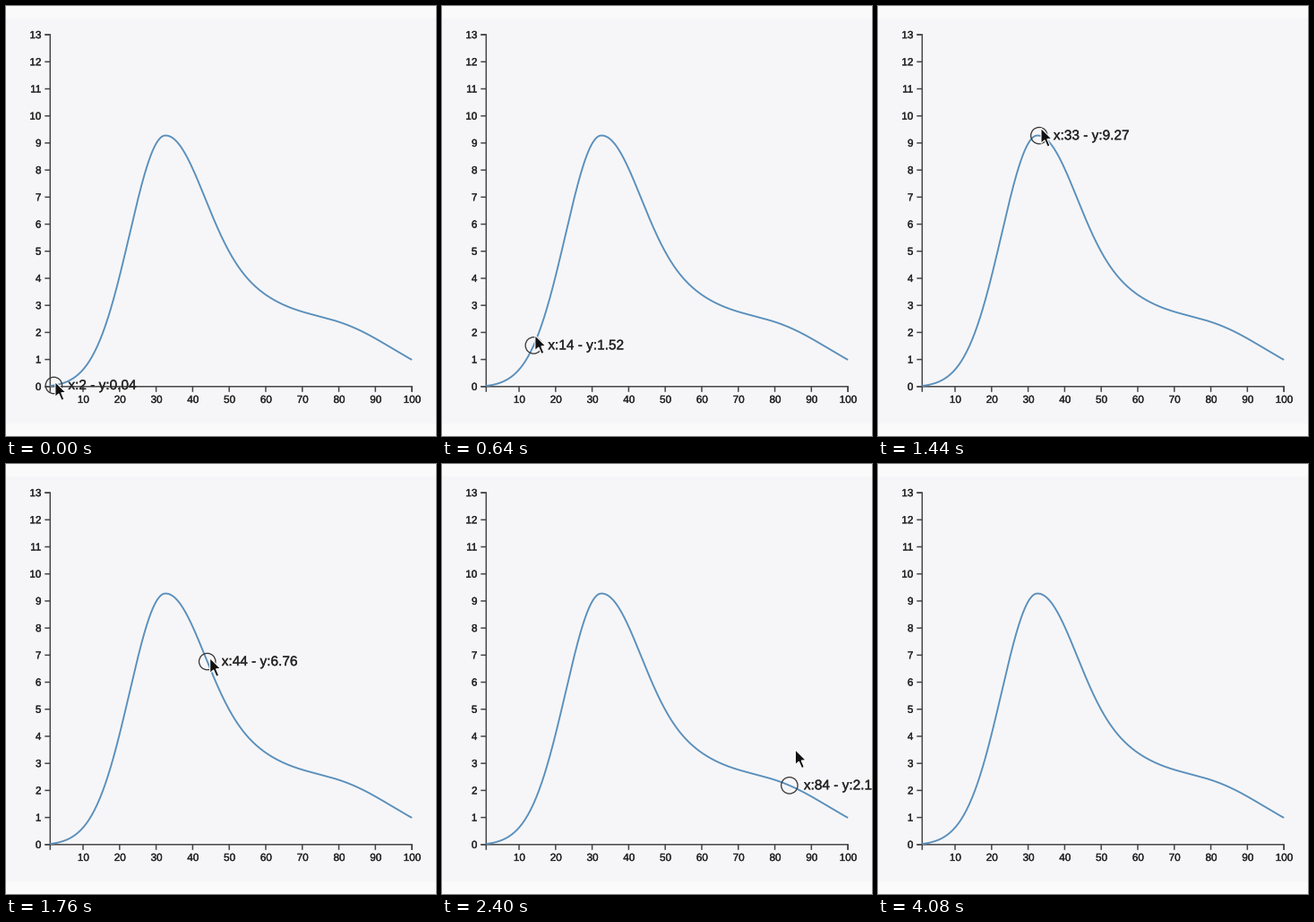
A matplotlib script that plays this animation: 480 by 480 pixels, repeating every 4240 ms.

```python
import numpy as np
import matplotlib.pyplot as plt
from matplotlib.animation import FuncAnimation
from matplotlib.patches import Circle, Polygon, Rectangle
from matplotlib.patheffects import Normal, Stroke

SIZE, DPI = 480, 100
FRAMES, STEP = 53, 80
LEAVE, GONE = 34, 37  # the pointer moves off the chart, then is hidden
PT = 72 / DPI  # points per pixel
INK, AXIS = "#262626", "#454545"

plt.rcParams["path.snap"] = False


def px(x):
    return 49.3 + (x - 1) * 4.079


def py(y):
    return 424.8 - y * 30.21


def bell(z):
    return np.exp(-z**2 / 2)


def density(x):
    """A peak with a slowly widening right flank, plus a broad shoulder."""
    d = x - 32.39
    flank = 13.385 + 3.6 * (1 - np.exp(-(np.maximum(d, 0) / 25)**3))
    peak = 9.23 * bell(d / np.where(d < 0, 9.726, flank))
    shoulder = 2.25 * bell((x - 78) / 17.4)
    return peak + shoulder - 0.027


def travel(i):
    """Speeds up along the x axis until it reaches the end."""
    return min(100, round(2 + 1.55 * i + 35.5 * (i / 30)**4.8))


def pointer_offset(i):
    """Pointer tip relative to the ring, in pixels."""
    sway = 8 * np.sin(np.pi * min(i, 22) / 22)
    lift = 36 * (max(0, min(i, 32) - 22) / 8)**2
    return 1.5 + 5 * (min(i, 32) / 30)**4 + 12 * max(0, i - LEAVE), -4 - sway - lift


fig = plt.figure(figsize=(SIZE / DPI, SIZE / DPI), dpi=DPI, facecolor="#fafafa")
ax = fig.add_axes([0, 0, 1, 1])
ax.set(xlim=(0, SIZE), ylim=(SIZE, 0))
ax.axis("off")


def line(xs, ys, color=AXIS, width=1.5):
    ax.plot(xs, ys, color=color, lw=width * PT, solid_capstyle="butt",
            solid_joinstyle="miter")


def label(x, y, text, size, **kw):
    heavier = [Stroke(linewidth=0.35 * PT, foreground=INK), Normal()]
    return ax.text(x, y, text, fontname="Liberation Sans", fontsize=size * PT,
                   color=INK, va="baseline", path_effects=heavier, **kw)


ax.add_patch(Rectangle((0, 14), SIZE, 452, color="#f6f6f8", lw=0))

left, right, top, base = px(1), px(100), py(13), py(0)
line([left - 6, left, left, left - 6], [top, top, base, base])
line([left, left, right, right], [base + 6, base, base, base + 6])
for v in range(14):
    line([left - 6, left], [py(v)] * 2)
    label(39.5, py(v) + 4, str(v), 11.7, ha="right")
for v in range(10, 101, 10):
    line([px(v)] * 2, [base, base + 6])
    label(px(v) + 0.5, 443, str(v), 11.7, ha="center")

grid = np.linspace(1, 100, 400)
line(px(grid), py(density(grid)), "#5a8fbb", 1.9)

ARROW = np.array([(0, 0), (0, 17), (4, 13.4), (7.2, 20.8),
                  (10, 19.6), (6.9, 12.2), (12, 12)])
ring = Circle((0, 0), 9.2, fill=False, ec="#383838", lw=1.3 * PT, zorder=4)
readout = label(0, 0, "", 15.4, zorder=4)
arrow = Polygon(ARROW, fc="#111111", ec="white", lw=1.1 * PT, zorder=5)
ax.add_patch(ring)
ax.add_patch(arrow)


def draw(i):
    shown = i < GONE
    for part in (ring, readout, arrow):
        part.set_visible(shown)
    if shown:
        x = travel(i)
        y = float(density(x))
        spot = px(x), py(y)
        ring.center = spot
        readout.set_position((spot[0] + 16, spot[1] + 4.5))
        readout.set_text(f"x:{x} - y:{y:.2f}")
        arrow.set_xy(ARROW + spot + pointer_offset(i))
    return ring, readout, arrow


anim = FuncAnimation(fig, draw, frames=FRAMES, interval=STEP, repeat=True,
                     repeat_delay=0, blit=False)
plt.show()
```
